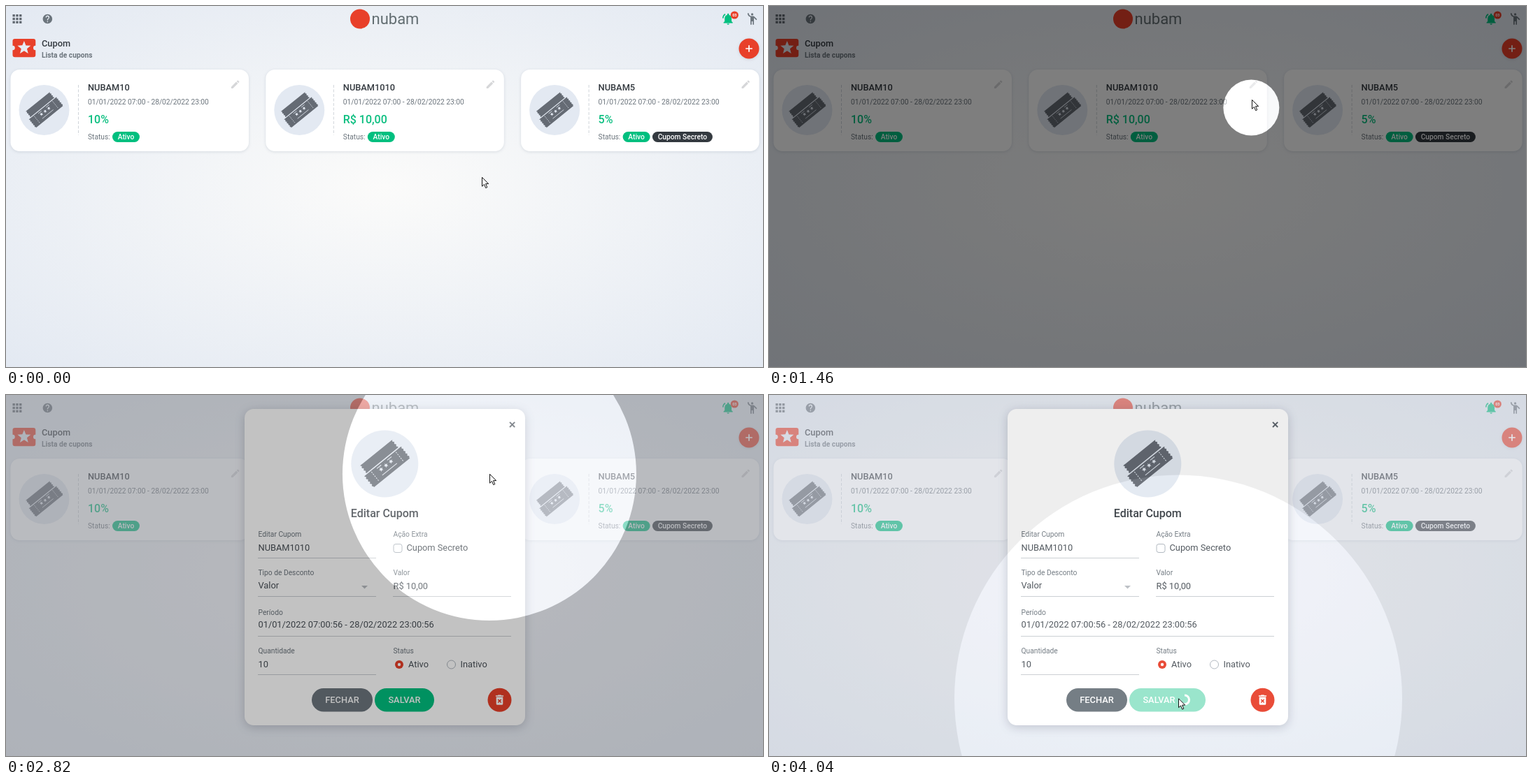
These frames come from a looping animation (1082 px wide and 517 px high, 4.12 s). An HTML page:

```html
<!DOCTYPE html>
<html lang="pt-BR">
<head>
<meta charset="utf-8">
<title>Cupom</title>
<style>
html, body { margin: 0; width: 100%; height: 100%; overflow: hidden; }
#stage {
  position: relative; width: 1082px; height: 517px; overflow: hidden;
  background: radial-gradient(#fbfbfa, #e3e9f2);
}
svg { position: absolute; left: 0; top: 0; }
text { font-family: Roboto, Arial, sans-serif; font-size: 10.24px; fill: #6c757d; white-space: pre; }
.m { font-size: 12.8px; fill: #495057; }
.l { font-size: 16px; }
.med { font-weight: 500; }
.bold { font-weight: 700; }
.dark { fill: #343a40; }
.green { fill: #0cbf80; }
.white { fill: #fff; }
.mid { text-anchor: middle; }
.url { font: 9.4px "Open Sans", "Noto Sans", sans-serif; fill: #c4c7cb; }
.card { filter: drop-shadow(0 1px 2px rgba(70, 85, 110, .16)); }
.sheet { filter: drop-shadow(0 3px 7px rgba(50, 60, 80, .24)); }
.line { stroke: #c9cdd1; stroke-width: 1; }
#spot {
  position: absolute; left: 0; top: 0; border-radius: 50%;
  background: #fff; box-shadow: 0 0 0 1600px #000;
}
</style>
</head>
<body>
<div id="stage">
  <svg id="page" width="1082" height="517"></svg>
  <div id="spot"></div>
  <svg width="1082" height="517">
    <path id="cursor" d="M.5 .3V13.2L3.5 10.4L5.7 15.6L7.8 14.7L5.6 9.6H9.7Z"
      fill="#fff" stroke="#111" stroke-width="1"/>
  </svg>
</div>
<script>
const RED = '#e8402a', GREEN = '#00bf7f', GRAY = '#6c757d', PALE = '#e3e9f2';
const LOOP = 4120;

const ICONS = {
  help: 'M12 2a10 10 0 1 0 0 20 10 10 0 0 0 0-20zm1 17h-2v-2h2v2zm2.07-7.75l-.9.92C13.45 12.9 13 13.5 13 15h-2v-.5c0-1.1.45-2.1 1.17-2.83l1.24-1.26A2 2 0 1 0 10 9H8a4 4 0 1 1 7.07 2.25z',
  bell: 'M7.58 4.08L6.15 2.65A10.5 10.5 0 0 0 2.03 10.5h2a8.5 8.5 0 0 1 3.55-6.42zm12.39 6.42h2a10.5 10.5 0 0 0-4.12-7.85l-1.42 1.43a8.5 8.5 0 0 1 3.54 6.42zM18 11c0-3.07-1.64-5.64-4.5-6.32V4a1.5 1.5 0 0 0-3 0v.68C7.63 5.36 6 7.92 6 11v5l-2 2v1h16v-1l-2-2v-5zm-6 11a2 2 0 0 0 2-2h-4a2 2 0 0 0 2 2z',
  person: 'M10 4a2 2 0 1 0 4 0a2 2 0 1 0-4 0zM15.89 8.11C15.5 7.72 14.83 7 13.53 7h-2.54A5 5 0 0 1 6 2H4a7 7 0 0 0 5 6.71V22h2v-6h2v6h2V10.05L18.95 14l1.41-1.41z',
  coupon: 'M20 12a2 2 0 0 1 2-2V6a2 2 0 0 0-2-2H4a2 2 0 0 0-2 2v4a2 2 0 0 1 0 4v4a2 2 0 0 0 2 2h16a2 2 0 0 0 2-2v-4a2 2 0 0 1-2-2zm-4.42 4.8L12 14.5l-3.58 2.3 1.08-4.12-3.29-2.69 4.24-.25L12 5.8l1.54 3.95 4.24.25-3.29 2.69z',
  pencil: 'M3 17.25V21h3.75L17.81 9.94l-3.75-3.75zM20.71 7.04a1 1 0 0 0 0-1.41l-2.34-2.34a1 1 0 0 0-1.41 0l-1.83 1.83 3.75 3.75z',
  trash: 'M6 19a2 2 0 0 0 2 2h8a2 2 0 0 0 2-2V7H6zm2.46-7.12l1.41-1.41L12 12.59l2.12-2.12 1.41 1.41L13.41 14l2.12 2.12-1.41 1.41L12 15.41l-2.12 2.12-1.41-1.41L10.59 14zM15.5 4l-1-1h-5l-1 1H5v2h14V4z'
};

const icon = (name, x, y, scale, fill) =>
  `<path d="${ICONS[name]}" transform="translate(${x} ${y}) scale(${scale})" fill="${fill}"/>`;
const text = (x, y, str, cls = '') => `<text x="${x}" y="${y}" class="${cls}">${str}</text>`;
const rect = (x, y, w, h, r, fill, extra = '') =>
  `<rect x="${x}" y="${y}" width="${w}" height="${h}" rx="${r}" fill="${fill}" ${extra}/>`;
const circle = (x, y, r, fill, extra = '') => `<circle cx="${x}" cy="${y}" r="${r}" fill="${fill}" ${extra}/>`;
const rule = (x1, x2, y) => `<path class="line" d="M${x1} ${y}H${x2}"/>`;

function star(x, y, r) {
  const pts = Array.from({ length: 10 }, (_, i) => {
    const a = i * Math.PI / 5, d = i % 2 ? r * .45 : r;
    return `${(x + d * Math.sin(a)).toFixed(2)},${(y - d * Math.cos(a)).toFixed(2)}`;
  });
  return `<polygon points="${pts.join(' ')}" fill="${PALE}"/>`;
}

// Two tilted paper tickets with nibbled ends on a pale disc.
function tickets(x, y, scale) {
  const bites = (u, v1, v2) =>
    `<path d="M${u} ${v1}V${v2}" stroke="${PALE}" stroke-width="2.6" stroke-linecap="round" stroke-dasharray="0 4.4"/>`;
  const perf = u => `<path d="M${u} -3V15" stroke="${PALE}" stroke-width="1" stroke-dasharray="2 1.6"/>`;
  return `<g transform="translate(${x} ${y}) scale(${scale})">${circle(0, 0, 48, PALE)}
    <g transform="rotate(-39)">
      ${rect(-29, -20, 59, 14, 1, '#656b74')}${bites(-29, -18, -6)}${bites(30, -18, -6)}
      ${rect(-34, -4.5, 68, 21, 1, '#656b74')}${bites(-34, -2, 17)}${bites(34, -2, 17)}
      ${perf(-22)}${perf(23)}
      ${[-9, 0, 9].map(u => star(u, 3, 3.4)).join('')}
      <path d="M-13 10.5H14M-13 -1.8H-5M6 -1.8H14" stroke="${PALE}" stroke-width="1"/>
    </g></g>`;
}

const pill = (x, w, label, fill) =>
  rect(x, 180, w, 15, 7.5, fill) + text(x + w / 2, 191, label, 'med white mid');

function card(i, code, value, secret) {
  return `<g transform="translate(${i * 364.8} 0)">
    ${rect(6.5, 91, 340.5, 117, 13, '#fff', 'class="card"')}
    ${tickets(54.5, 149, .75)}
    <path d="M103.5 113V185" stroke="#cfd4da" stroke-dasharray="4 2.5"/>
    ${icon('pencil', 320, 104.6, .64, '#d6d7d9')}
    ${text(117, 121, code, 'm med dark')}
    ${text(117, 141, '01/01/2022 07:00 - 28/02/2022 23:00')}
    ${text(117, 167.5, value, 'l med green')}
    ${text(117, 191, 'Status:')}
    ${pill(152, 39, 'Ativo', GREEN)}
    ${secret ? pill(194.3, 86, 'Cupom Secreto', '#343a40') : ''}
  </g>`;
}

function header() {
  let dots = '';
  for (let i = 0; i < 9; i++) dots += rect(9.5 + i % 3 * 4.8, 12 + (i / 3 | 0) * 4.8, 3.3, 3.3, 0, '#60676f');
  return `${dots}
    ${icon('help', 51.2, 10.3, .68, GRAY)}
    ${circle(506, 18.5, 14, RED)}
    <text x="522.5" y="26" style="font-size:22px;fill:#636e72">nubam</text>
    ${icon('bell', 1022.3, 8.8, .82, GREEN)}
    ${circle(1041.3, 13, 5.6, RED)}
    <text x="1041.3" y="15" class="bold white mid" style="font-size:5.5px">03</text>
    ${icon('person', 1056.6, 8.6, .83, GRAY)}
    ${icon('coupon', 6.2, 40.4, 1.64, RED)}
    ${text(51, 58, 'Cupom', 'm med dark')}
    ${text(51, 74, 'Lista de cupons', 'bold')}
    ${circle(1062, 61, 14.5, RED, 'class="card"')}
    <path d="M1057.2 61H1066.8M1062 56.2V65.8" stroke="#fff" stroke-width="1.7"/>`;
}

const button = (id, x, w, fill, label, tx) =>
  `<g id="${id}">${rect(x, 420, w, 33.5, 16.75, fill)}${text(tx, 441, label, 'm med white mid')}</g>`;

function modal() {
  return `${rect(341, 20, 401, 453, 13, '#fff', 'class="sheet"')}
    <path d="M720 38.8L727.2 46M727.2 38.8L720 46" stroke="#5f666e" stroke-width="1.9"/>
    ${tickets(541.3, 98.5, 1)}
    ${text(541.3, 174.5, 'Editar Cupom', 'l med dark mid')}
    ${text(360.5, 203, 'Editar Cupom')}${text(360.5, 222.5, 'NUBAM1010', 'm')}${rule(360, 529, 233.5)}
    ${text(553.5, 203, 'Ação Extra')}
    ${rect(554, 213.5, 12, 12, 3, '#fff', 'stroke="#adb5bd"')}${text(572.5, 222.5, 'Cupom Secreto', 'm')}
    ${text(360.5, 258, 'Tipo de Desconto')}${text(360.5, 276.5, 'Valor', 'm')}${rule(360, 529, 288.5)}
    <path d="M508 273H517L512.5 277.5Z" fill="#b9bdc2"/>
    ${text(553.5, 258, 'Valor')}${text(553.5, 277.5, 'R$ 10,00', 'm')}${rule(553, 722, 288.5)}
    ${text(360.5, 315, 'Período')}
    ${text(360.5, 333, '01/01/2022 07:00:56 - 28/02/2022 23:00:56', 'm')}${rule(360, 722, 345.5)}
    ${text(360.5, 370, 'Quantidade')}${text(360.5, 390, '10', 'm')}${rule(360, 529, 400.5)}
    ${text(553.5, 370, 'Status')}
    ${circle(562, 386, 6, RED)}${circle(562, 386, 2.2, '#fff')}${text(575, 390, 'Ativo', 'm')}
    ${circle(636.5, 386, 6, '#fff', 'stroke="#adb5bd"')}${text(649.5, 390, 'Inativo', 'm')}
    ${button('close', 437, 87, GRAY, 'FECHAR', 480.5)}
    ${button('save', 527, 85, GREEN, 'SALVAR', 569.5)}
    <g id="saving" opacity=".42">
      ${button('busy', 515, 109, GREEN, 'SALVAR', 557.5)}
    </g>
    <path id="spinner" d="M0 -6.5A6.5 6.5 0 1 1 -6.5 0" fill="none" stroke="#fff" stroke-width="3"/>
    ${circle(705.5, 436.7, 17, RED)}${icon('trash', 695.9, 427, .8, '#fff')}`;
}

const $ = id => document.getElementById(id);
$('page').innerHTML = header()
  + card(0, 'NUBAM10', '10%') + card(1, 'NUBAM1010', 'R$ 10,00') + card(2, 'NUBAM5', '5%', true)
  + `<g id="status">${rect(-4, 500, 308.5, 21, 2, '#26272c')}
     ${text(-3, 512.5, 'https://nubam-backoffice-6jw5r4h7y-rio-ma-lu.vercel.app/app/cupons', 'url')}</g>`
  + rect(0, 0, 1082, 517, 0, '#e6ecf5', 'id="veil"')
  + `<g id="modal">${modal()}</g>`;

// The picture is refreshed only at these moments (ms).
const TICKS = [0, 690, 770, 850, 930, 1000, 1070, 1130,
  1220, 1290, 1350, 1420, 1480, 1550, 1620, 1680, 1740,
  1820, 1890, 1960, 2020, 2090, 2160,
  2750, 2820, 2910, 2970, 3030, 3090, 3150, 3210,
  3290, 3360, 3430, 3490, 3550, 3620, 3690, 3760,
  3850, 3910, 3980, 4040];

// Pointer path: time, x, y
const PATH = [[0, 680, 245], [1180, 680, 245], [1330, 688, 172], [1470, 691, 113],
  [3110, 691, 113], [3183, 679, 149], [3490, 616, 370], [3620, 571, 431], [3730, 585, 434.5]];

const clamp = v => Math.min(1, Math.max(0, v));
const lerp = (a, b, k) => a + (b - a) * k;
const ramp = (t, from, ms) => clamp((t - from) / ms);
const easeOut = k => 1 - (1 - k) ** 3;

function pointer(t) {
  const i = PATH.findIndex(p => p[0] > t);
  if (i < 0) return PATH[PATH.length - 1].slice(1);
  const [a, b] = [PATH[i - 1], PATH[i]], k = ramp(t, a[0], b[0] - a[0]);
  return [lerp(a[1], b[1], k), lerp(a[2], b[2], k)];
}

const focus = t => [[650, 1500], [2725, 3790]].reduce((sum, [on, off]) =>
  sum + easeOut(ramp(t, on, 500)) - easeOut(ramp(t, off, 500)), 0);

function draw(t) {
  const [cx, cy] = pointer(t);
  $('cursor').setAttribute('transform', `translate(${cx} ${cy})`);

  // Spotlight trails the pointer slightly; it shrinks as it gets stronger.
  const p = clamp(focus(t)), r = lerp(360, 40, p), [sx, sy] = pointer(Math.max(0, t - 27));
  const s = $('spot').style;
  s.width = s.height = 2 * r + 'px';
  s.transform = `translate(${sx - r}px, ${sy - r}px)`;
  s.opacity = p / 2;

  $('status').setAttribute('opacity', ramp(t, 1520, 100) - ramp(t, 1800, 150));
  $('veil').setAttribute('opacity', .45 * ramp(t, 1790, 150));
  const m = easeOut(ramp(t, 1830, 300));
  $('modal').setAttribute('opacity', m);
  $('modal').setAttribute('transform', `translate(0 ${-40 * (1 - m)})`);

  const busy = t >= 3850;
  $('close').setAttribute('transform', `translate(${busy ? -12 : 0} 0)`);
  $('save').style.display = busy ? 'none' : '';
  $('saving').style.display = $('spinner').style.display = busy ? '' : 'none';
  $('spinner').setAttribute('transform', `translate(594 436.5) rotate(${(t - 4040) / 750 * 360})`);
}

function loop() {
  const t = performance.now() % LOOP;
  draw(TICKS.filter(k => k <= t).pop());
  requestAnimationFrame(loop);
}
loop();
</script>
</body>
</html>
```
